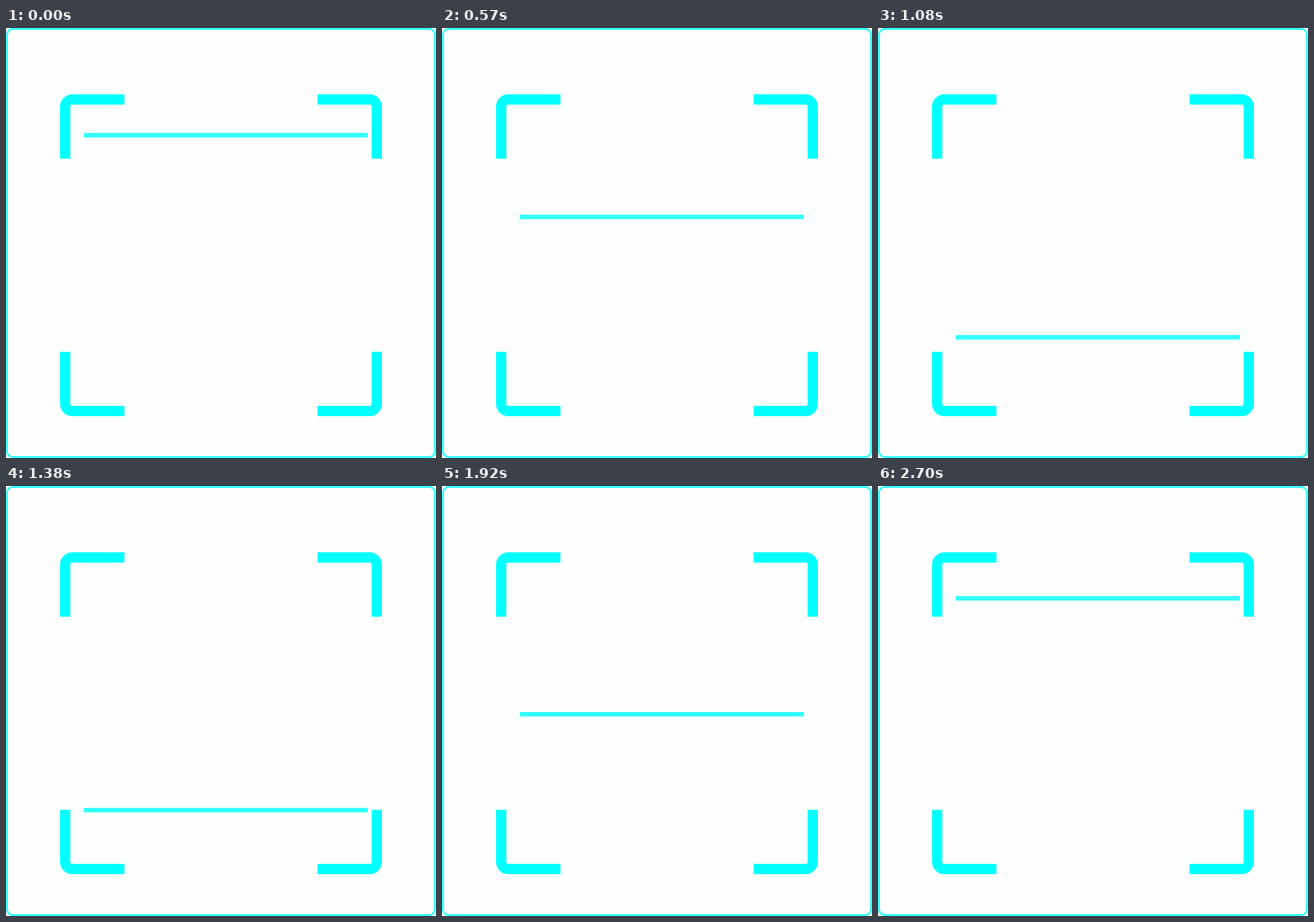
Write an HTML page that moves like this. It is 668 by 668 pixels and loops after 2730 ms.

```html
<!DOCTYPE html>
<html lang="en">
<head>
<meta charset="utf-8">
<title>Scanner</title>
<style>
  html, body { margin: 0; width: 100%; height: 100%; overflow: hidden; background: #fefefe; }
  svg { display: block; width: 668px; height: 668px; }
</style>
</head>
<body>
<svg viewBox="0 0 668 668">
  <defs>
    <path id="corner" d="M92 203V122A11 11 0 0 1 103 111H184" fill="none" stroke="#0ff" stroke-width="16"/>
  </defs>
  <rect x="1.5" y="1.5" width="665" height="665" rx="9" fill="none" stroke="#3ff" stroke-width="3"/>
  <use href="#corner"/>
  <use href="#corner" transform="matrix(-1 0 0 1 668 0)"/>
  <use href="#corner" transform="matrix(1 0 0 -1 0 706)"/>
  <use href="#corner" transform="matrix(-1 0 0 -1 668 706)"/>
  <rect id="beam" x="121" y="163" width="441" height="7" fill="#3ff"/>
</svg>
<script>
  const STEP = 30, STEPS = 91;
  // Beam path: [step, top edge]
  const keys = [
    [0, 163], [11, 232], [18, 282], [26, 354], [36, 477], [41, 524], [46, 500],
    [54, 476], [64, 351], [72, 299], [79, 211], [90, 171], [91, 163]
  ];
  const beam = document.getElementById('beam');

  const slope = i => (keys[i + 1][1] - keys[i][1]) / (keys[i + 1][0] - keys[i][0]);

  // Harmonic mean keeps the curve monotone; turning points stay sharp.
  function tangent(i, neighbour) {
    const own = slope(i);
    if (neighbour < 0 || neighbour > keys.length - 2) return own;
    const other = slope(neighbour);
    return own * other > 0 ? 2 * own * other / (own + other) : own;
  }

  function beamTop(step) {
    const i = keys.findIndex((key, k) => step < keys[k + 1][0]);
    const [x0, y0] = keys[i], [x1, y1] = keys[i + 1];
    const span = x1 - x0, u = (step - x0) / span, v = 1 - u;
    return y0 * v * v * (1 + 2 * u) + y1 * u * u * (3 - 2 * u)
      + span * u * v * (tangent(i, i - 1) * v - tangent(i, i + 1) * u);
  }

  const start = performance.now();
  function draw() {
    const elapsed = Math.max(0, performance.now() - start);
    beam.setAttribute('y', Math.round(beamTop(Math.floor(elapsed / STEP) % STEPS)));
    requestAnimationFrame(draw);
  }
  draw();
</script>
</body>
</html>
```
